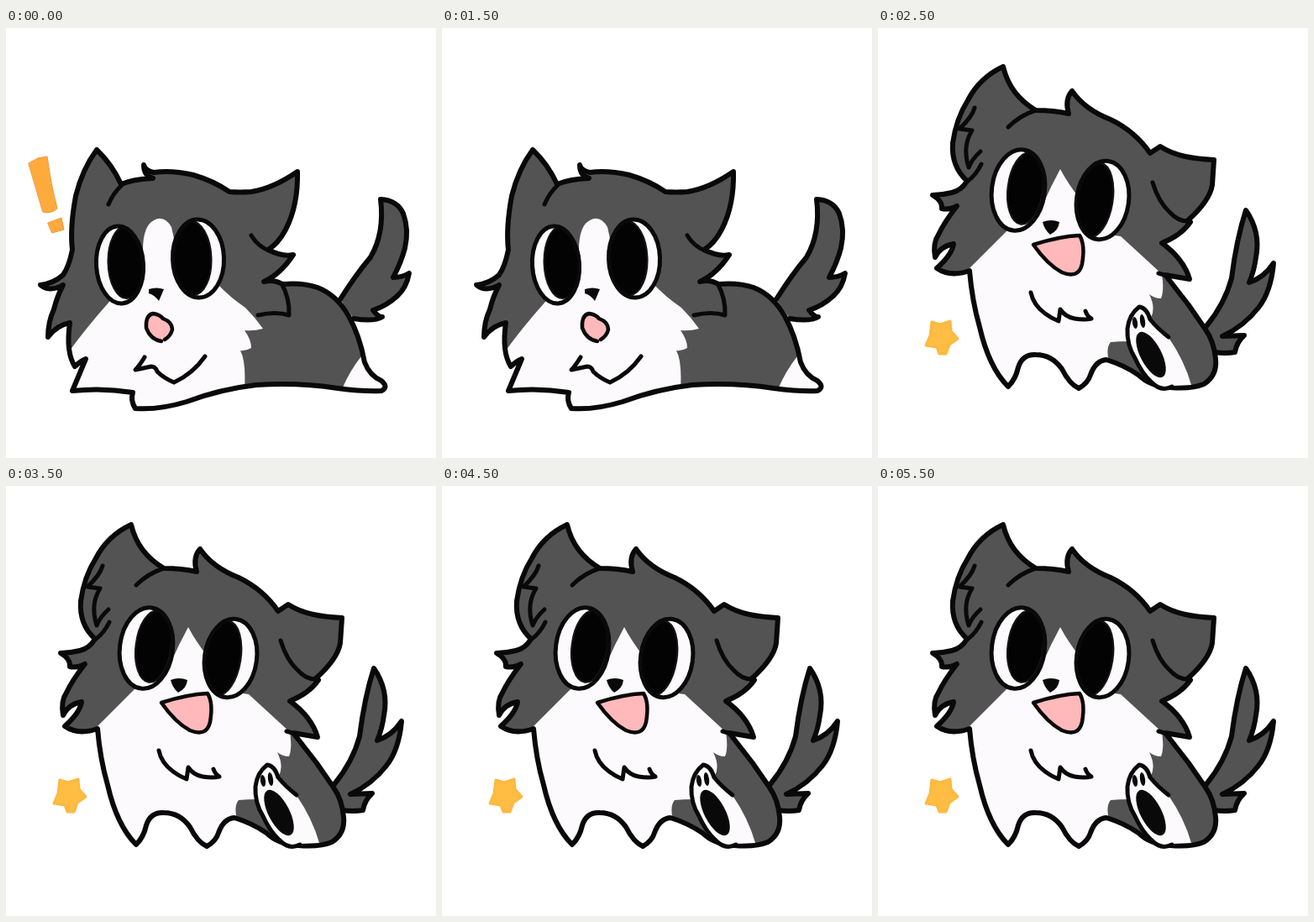
An HTML page with a canvas for the animation above (6 s loop, 512 by 512 pixels).

```html
<!DOCTYPE html>
<html lang="en">
<head>
<meta charset="utf-8">
<title>Happy dog</title>
<style>
  html, body { margin: 0; width: 100%; height: 100%; overflow: hidden; background: #fff; }
  canvas { display: block; width: 100vw; height: 100vh; }
</style>
</head>
<body>
<canvas id="stage" width="512" height="512"></canvas>
<script>
const ctx = document.getElementById('stage').getContext('2d');
const GREY = '#535353', FUR = '#fdfafd', INK = '#090909', PINK = '#ffb9ba';
const LOOP = 6000, BEAT = 500;
const path = d => new Path2D(d);

const lying = {
  line: 6,
  tail: path(`M398 323 Q417 293 434 273 Q451 244 446 204 Q466 205 473 221
    Q480 240 475 262 Q471 278 461 297 Q472 297 480 292 Q477 309 466 319
    Q453 331 437 336 Q443 344 448 344 Q438 350 414 346`),
  body: path(`M137 186 Q126 162 108 145 Q91 168 83 200 Q76 238 79 264
    Q75 284 68 294 Q57 304 41 306 Q52 315 68 306 Q61 319 57 335 Q50 350 50 368
    Q60 354 76 351 Q71 386 82 403 Q88 397 95 394 Q87 413 79 432
    Q115 428 151 434 Q148 444 154 453 Q182 455 215 445 Q255 430 298 425
    Q350 422 395 429 Q426 433 447 432 Q456 428 447 420 Q433 414 427 398
    Q421 366 408 343 Q394 318 371 309 Q354 303 329 305 Q319 299 307 302
    Q327 293 342 270 Q330 273 312 264 Q324 257 333 240 Q348 211 347 171
    Q318 191 292 195 Q278 196 266 195 Q247 182 223 175 Q197 169 176 172
    Q166 170 164 163 Q164 176 175 179 Q151 180 137 186 Z`),
  white: path(`M70 392 Q96 356 123 326 L163 270 Q162 236 176 229
    Q188 222 197 237 Q202 260 211 300 L252 305 Q266 320 285 333
    Q297 345 306 358 Q295 361 284 360 Q292 371 292 381 Q285 385 279 384
    Q286 397 284 430 L160 470 L60 450 Z
    M423 391 Q410 407 400 430 L460 440 L460 410 Z`),
  lines: path(`M138 187 Q128 196 122 210 M292 247 Q300 260 313 265
    M328 304 Q338 322 337 342 Q321 337 300 342
    M165 392 Q159 402 154 407 L173 403 Q178 403 180 409 Q188 417 200 422
    Q222 412 237 391`),
  mouth: path('M185 373 Q172 371 167 357 Q166 342 175 340 Q183 341 187 346 Q198 350 198 359 Q196 367 189 371'),
  nose: path('M170 311 Q179 308 188 311 L182 325 Q177 318 170 316 Z'),
  eyes: [
    { x: 135.5, y: 282, rx: 28, ry: 46, tilt: -.06, px: 143, py: 279, prx: 21.5, pry: 43, ptilt: -.02 },
    { x: 229, y: 274.5, rx: 30.5, ry: 46.5, tilt: -.03, px: 222, py: 274, prx: 22.5, pry: 44, ptilt: -.04 }
  ]
};

const sitting = {
  line: 6,
  body: path(`M188 98 Q157 80 149 46 Q121 59 107 86 Q93 108 89 137
    Q87 165 106 182 Q100 193 88 196 Q76 199 65 199 Q77 206 76 215 Q84 217 94 212
    Q79 231 72 246 Q65 256 68 273 Q74 260 90 257 Q88 270 70 286
    Q86 297 109 289 Q112 325 121 356 Q132 404 155 427 Q164 418 167 404
    Q172 388 188 389 Q207 389 219 406 Q228 424 239 429 Q250 423 253 413
    Q259 396 272 395 Q292 401 310 413 Q324 427 348 428 Q374 430 388 424
    Q404 414 402 394 Q400 373 390 359 L370 330 Q356 312 342 294
    L371 299 Q364 275 338 256 Q361 247 372 231 L368 230
    Q395 206 398 187 L400 157 Q380 156 366 153 Q348 149 336 141
    L324 149 Q306 123 277 109 Q246 97 231 75 Q222 85 227 102 Q209 98 188 98 Z`),
  white: path(`M105 290 L155 240 L196 211 Q206 188 217 168 Q226 185 240 203
    L244 242 L289 248 L338 293 Q341 312 337 322 Q329 322 323 317
    Q331 333 325 345 L300 373 Q287 373 277 374 Q271 381 275 397
    L240 440 L145 440 Z`),
  lines: path(`M188 98 Q169 104 155 118 M123 162 Q117 175 106 183
    M115 95 Q112 106 97 120 L112 122 Q100 141 108 166 Q112 156 122 147
    M327 184 Q334 207 347 219 Q358 231 370 230 M334 292 L344 295
    M182 315 Q185 330 199 340 Q207 346 215 349 L217 335
    Q223 344 234 346 Q246 348 254 346 Q249 343 247 337`),
  mouth: path('M185 258 Q216 248 240 247 Q247 258 243 281 Q239 299 219 291 Q202 282 185 258 Z'),
  nose: path('M196 231 Q206 227 216 231 Q215 241 205 246 Q198 240 196 231 Z'),
  eyes: [
    { x: 167, y: 193, rx: 31.5, ry: 48.5, tilt: .13, px: 175.5, py: 191, prx: 21, pry: 43, ptilt: .13 },
    { x: 267.5, y: 205, rx: 31, ry: 47, tilt: .14, px: 258.5, py: 205, prx: 21, pry: 44.5, ptilt: .16 }
  ]
};

const wags = [
  path(`M391 359 Q420 333 435 305 Q449 266 468 235 Q479 263 466 292
    Q457 306 454 319 Q474 316 486 302 Q479 330 461 350 Q439 367 412 377
    L432 377 Q421 388 403 392`),
  path(`M391 355 Q413 328 421 298 Q427 251 438 217 Q456 243 450 273
    Q448 289 442 303 Q460 297 471 280 Q468 314 453 333 Q436 355 410 367
    L436 366 Q427 374 425 386 Q414 388 400 386`)
];

const paw = {
  fill: path('M312 331 Q295 338 297 370 Q304 393 323 420 Q338 432 351 426 L373 425 Q365 396 345 367 L325 348 Z'),
  edge: path('M346 368 Q333 358 324 347 Q320 333 311 332 Q299 341 297 358 Q296 377 306 393 Q314 411 325 421 Q337 434 350 427')
};

const bang = path('M27 161 L38 155 L49 153 Q53 185 61 215 Q53 222 44 219 Z M50 232 L66 226 L69 240 L55 244 Z');
const stars = [
  path('M366 69 L371 69 L370 84 L378 96 L364 98 L353 109 L346 98 L330 94 L340 85 L342 72 L354 77 Z'),
  path('M64 350 L74 353 L86 349 L87 361 L95 370 L85 377 L81 388 L73 388 L70 380 L57 378 L62 366 Z')
];

function stroke(p, width, color = INK) {
  ctx.lineWidth = width;
  ctx.strokeStyle = color;
  ctx.stroke(p);
}

function fill(p, color) {
  ctx.fillStyle = color;
  ctx.fill(p);
}

function shape(p, color, width) {
  fill(p, color);
  stroke(p, width);
}

function oval(x, y, rx, ry, tilt) {
  const p = new Path2D();
  p.ellipse(x, y, rx, ry, tilt, 0, Math.PI * 2);
  return p;
}

function drawEye(e) {
  const ball = oval(e.x, e.y, e.rx, e.ry, e.tilt);
  fill(ball, FUR);
  ctx.save();
  ctx.clip(ball);
  const pupil = oval(e.px, e.py, e.prx, e.pry, e.ptilt);
  fill(pupil, '#030303');
  stroke(pupil, 2, '#151515');
  ctx.restore();
  stroke(ball, 5);
}

function drawDog(pose, tail) {
  shape(tail, GREY, pose.line);
  fill(pose.body, GREY);
  ctx.save();
  ctx.clip(pose.body);
  fill(pose.white, FUR);
  ctx.restore();
  stroke(pose.body, pose.line);
  stroke(pose.lines, pose.line - 1);
  pose.eyes.forEach(drawEye);
  fill(pose.nose, INK);
  shape(pose.mouth, PINK, 4.5);
}

function drawPaw() {
  fill(paw.fill, FUR);
  stroke(paw.edge, 5);
  fill(oval(325, 389, 12.5, 30, -.48), INK);
  fill(oval(306, 351, 3, 7, -.15), INK);
  fill(oval(315, 349, 3, 8, -.15), INK);
}

function drawStar(p) {
  fill(p, '#ffbd43');
  stroke(p, 3, '#fdb940');
}

function draw(time) {
  const beat = Math.floor((time % LOOP) / BEAT);
  const odd = beat % 2;
  ctx.fillStyle = '#fff';
  ctx.fillRect(0, 0, 512, 512);
  if (beat < 4) {
    drawDog(lying, lying.tail);
    if (!odd) {
      fill(bang, '#ffaa3c');
      stroke(bang, 1, '#e99a36');
    }
  } else {
    drawDog(sitting, wags[odd]);
    drawPaw();
    drawStar(stars[odd]);
  }
}

ctx.lineCap = ctx.lineJoin = 'round';
const start = performance.now();
function tick() {
  draw(performance.now() - start);
  requestAnimationFrame(tick);
}
tick();
</script>
</body>
</html>
```
